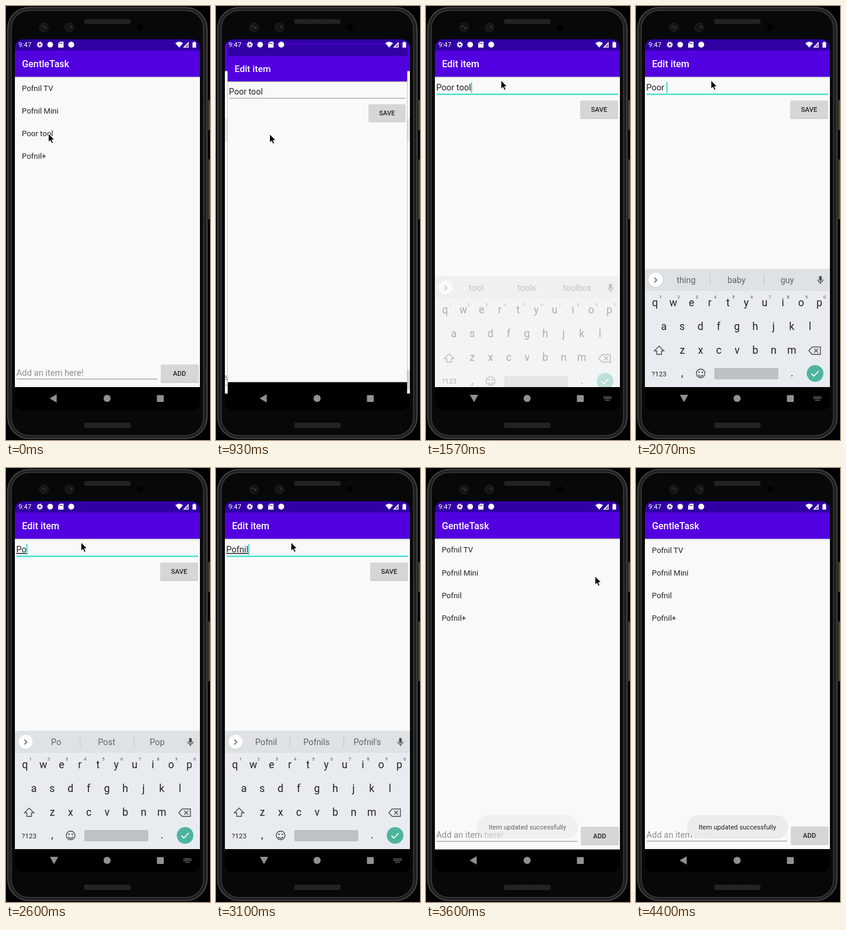
Recreate the animation shown at these times as an HTML page. Size 344 by 730 pixels, loop 4430 ms.

```html
<!DOCTYPE html>
<html lang="en">
<head>
<meta charset="utf-8">
<title>List app demo</title>
<style>
  html, body { margin: 0; width: 100%; height: 100%; overflow: hidden; background: #000; }
  svg { display: block; width: 344px; height: 730px; }
  text { font-family: Roboto, sans-serif; fill: #222; white-space: pre; }
  .item { font-size: 13px; }
  .title { font-size: 15.9px; font-weight: 500; fill: #fff; }
  .field { font-size: 14.5px; }
  .btn { font-size: 11.2px; font-weight: 500; text-anchor: middle; }
  .mid { text-anchor: middle; }
  .key { font-size: 17.5px; }
  .hint { font-size: 7.5px; fill: #50555a; }
  .sug { font-size: 14.3px; fill: #5f6368; }
  .icon { fill: none; stroke: #4a4e52; stroke-width: 1.4; }
</style>
</head>
<body>
<svg viewBox="0 0 344 730">
  <defs>
    <clipPath id="screen"><rect x="15" y="56" width="312" height="624" rx="14"/></clipPath>
    <clipPath id="aboveNav"><rect x="15" y="56" width="312" height="585"/></clipPath>
    <pattern id="mesh" width="3" height="3" patternUnits="userSpaceOnUse">
      <rect width="3" height="3" fill="#262626"/><circle cx="1.5" cy="1.5" r=".9" fill="#1a1a1a"/>
    </pattern>
    <linearGradient id="shade" x2="0" y2="1">
      <stop stop-opacity=".2"/><stop offset="1" stop-opacity="0"/>
    </linearGradient>
    <g id="window">
      <rect x="15" y="56" width="312" height="624" fill="#000"/>
      <rect x="15" y="56" width="312" height="19.5" fill="#3000a4"/>
      <rect x="15" y="119" width="312" height="522" fill="#f9f9f9"/>
      <rect x="15" y="119" width="312" height="3" fill="url(#shade)"/>
      <rect x="15" y="75" width="312" height="44" fill="#5300e1"/>
    </g>
    <g id="button">
      <rect y="1" width="64" height="30" rx="2" fill="#000" opacity=".18"/>
      <rect width="64" height="29.5" rx="2" fill="#d5d6d6"/>
    </g>
  </defs>

  <!-- phone body -->
  <g fill="none">
    <rect x="338" y="158" width="6" height="51" rx="2" fill="#454545"/>
    <rect x="338" y="258" width="6" height="101" rx="2" fill="#454545"/>
    <rect x="1" y="1" width="340" height="728" rx="38" fill="#080808"/>
    <rect x="6" y="5" width="330" height="720" rx="33" stroke="#1f1f1f" stroke-width="6"/>
    <rect x="3" y="2.5" width="336" height="725" rx="36" stroke="#4c4c4c" stroke-width="1.6"/>
    <rect x="9" y="7.5" width="324" height="715" rx="30" stroke="#3c3c3c" stroke-width="1.4"/>
    <rect x="132" y="22" width="78" height="8" rx="2" fill="url(#mesh)"/>
    <rect x="132" y="701" width="78" height="9" rx="2" fill="url(#mesh)"/>
    <g fill="#151515" stroke="#242424">
      <circle cx="64" cy="36" r="7.5"/><circle cx="107" cy="36" r="7.5"/>
    </g>
    <path d="M61 33l2 2M65 38l2-3M109 33l2 4" stroke="#484848" stroke-width="1.5"/>
    <circle cx="226" cy="36" r="5.5" fill="#000"/>
  </g>

  <g clip-path="url(#screen)">
    <rect x="15" y="56" width="312" height="624"/>
    <g id="list">
      <use href="#window"/>
      <rect id="ripple" x="15" y="196" width="312" height="38" opacity="0"/>
      <text class="title" x="27" y="103.3">GentleTask</text>
      <g class="item">
        <text x="26.8" y="143">Pofnil TV</text>
        <text x="26.8" y="181">Pofnil Mini</text>
        <text id="third" x="26.8" y="219">Poor tool</text>
        <text x="26.8" y="257.3">Pofnil+</text>
      </g>
      <text class="field" x="17.6" y="621.5" style="fill:#8d8d8d">Add an item here!</text>
      <path d="M18 627.5H255" stroke="#8a8a8a"/>
      <use href="#button" x="261" y="603"/>
      <text class="btn" x="292.5" y="622">ADD</text>
    </g>
    <g id="edit">
      <use href="#window"/>
      <text class="title" x="27" y="103.3">Edit item</text>
      <text id="entry" class="field" x="17.2" y="142"></text>
      <path id="line" d="M18 148.5H324"/>
      <path id="caret" stroke="#19d6c0" stroke-width="1.6"/>
      <use href="#button" x="260" y="159"/>
      <text class="btn" x="292" y="178">SAVE</text>
    </g>

    <g clip-path="url(#aboveNav)">
      <g id="keyboard">
        <rect x="15" y="442" width="312" height="199" fill="#e8ecf0"/>
        <rect x="15" y="442" width="312" height="37" fill="#dee2e5"/>
        <circle cx="33" cy="461.5" r="12.3" fill="#000" opacity=".12"/>
        <circle cx="33" cy="460.7" r="12" fill="#fff"/>
        <path d="M31 457l4 4-4 4" class="icon"/>
        <path d="M125 451V470M215.5 451V470" stroke="#c3c7cb"/>
        <g class="mid" id="sugs">
          <text class="sug" x="84.5" y="466"/><text class="sug" x="169.5" y="466"/><text class="sug" x="255" y="466"/>
        </g>
        <rect x="308.7" y="454" width="4.6" height="8.5" rx="2.3" fill="#4a4e52"/>
        <path d="M306.5 460a4.5 4.5 0 0 0 9 0M311 464.5V468" class="icon"/>
        <g id="keys"></g>
        <path d="M39 572l-8 8h4v6h8v-6h4z" class="icon"/>
        <path d="M297 573.5H311V586H297L291.5 579.7zM300.5 576.5l6.500 6.500M307 576.5l-6.500 6.500" class="icon"/>
        <circle cx="109" cy="618" r="7.3" class="icon"/>
        <path d="M105 620a4.3 4.3 0 0 0 8 0" class="icon"/>
        <circle cx="106.3" cy="616" r="1.1"/><circle cx="111.7" cy="616" r="1.1"/>
        <rect x="132" y="609" width="108" height="19" rx="2" fill="#bcc1c6"/>
        <circle cx="302" cy="618" r="14" fill="#4db49f"/>
        <path d="M296 618.5l4 4 8-8.5" fill="none" stroke="#fff" stroke-width="1.8"/>
      </g>
    </g>

    <g id="toast">
      <rect x="86" y="585" width="170" height="38.5" rx="19" opacity=".06"/>
      <rect x="86" y="584" width="170" height="38" rx="19" fill="#ececec" opacity=".94"/>
      <text class="mid" x="171" y="607.5" font-size="11.2">Item updated successfully</text>
    </g>

    <!-- status bar -->
    <g fill="#fff">
      <text x="21" y="69" font-size="11.3" style="fill:#fff">9:47</text>
      <circle cx="57" cy="65" r="2.8" fill="none" stroke="#fff" stroke-width="2"/>
      <circle cx="57" cy="65" r="4.4" fill="none" stroke="#fff" stroke-width="1.6" stroke-dasharray="1.73"/>
      <circle cx="74.5" cy="65" r="4.8"/>
      <path d="M91 60H97V70H88V63z"/>
      <path d="M90.5 62v2M92.5 62v2M94.5 62v2" stroke="#3000a4"/>
      <circle cx="110" cy="65" r="5"/>
      <path d="M285.5 62.5Q292 57.5 298.5 62.5L292 70zM308 60V70H298.5z"/>
      <path d="M302 69h5v-6z" fill="#3000a4" opacity=".6"/>
      <path d="M314.5 61.2h1.7V60h2.6v1.2h1.7V70h-6z"/>
    </g>

    <!-- navigation bar -->
    <g fill="#919191">
      <path id="back"/>
      <circle cx="170.5" cy="660" r="6"/>
      <rect x="254.5" y="654.5" width="11.5" height="11.5" rx="1"/>
      <path id="switcher" d="M299.5 657.5H312.5M299.5 660H312.5M302 663H310" fill="none"
        stroke="#919191" stroke-width="1.6" stroke-dasharray="1.6 .7"/>
    </g>
  </g>

  <path id="pointer" d="M0 0V14.5L3.3 11.4 5.5 16.6 8 15.5 5.8 10.5H10.3z" stroke="#fff"/>
</svg>
<script>
const LOOP = 4430, OPEN = 824, FOCUS = 1430, SHOW = 1490, CLOSE = 3350;
const $ = id => document.getElementById(id);
const clamp = v => Math.min(1, Math.max(0, v));
const part = (t, start, length) => clamp((t - start) / length);
const smooth = p => p * p * (3 - 2 * p);

// [time, entered text, suggestions]
const edits = [
  [0, 'Poor tool', 'tool tools toolbox'],
  [1770, 'Poor too', 'too took tool'],
  [1860, 'Poor to', 'to top too'],
  [1950, 'Poor t', 'to the thing'],
  [2030, 'Poor ', 'thing baby guy'],
  [2150, 'Poor', 'Poor Poorly Poorer'],
  [2240, 'Poo', 'Pool Poor Poof'],
  [2330, 'Po', 'Po Post Pop'],
  [2680, 'Pof', 'Pof Pofs Off'],
  [2860, 'Pofn', 'Pofn Pofnil Pond'],
  [2960, 'Pofni', 'Pofni Pofnil Pony'],
  [3060, 'Pofnil', "Pofnil Pofnils Pofnil's"]
];

// [time, x, y] of the mouse pointer tip
const path = [
  [30, 71.5, 214.5], [250, 90.5, 215.5], [1080, 90.5, 215.5], [1310, 126.5, 123],
  [1380, 126.5, 125], [3150, 126.5, 125], [3320, 285, 182]
];

const key = (s, x, y, cls = 'key') => `<text class="${cls} mid" x="${x}" y="${y}">${s}</text>`;
const row = (letters, x, y, cls) => [...letters].map((c, i) => key(c, x + i * 30.8, y, cls)).join('');
$('keys').innerHTML = row('qwertyuiop', 32, 504.5) + row('asdfghjkl', 47, 544.5) +
  row('zxcvbnm', 78, 584.5) + key(',', 78, 623) + key('.', 263, 623) +
  row('1234567890', 41, 492, 'hint') +
  '<text class="mid" x="39" y="622.5" font-size="11.5">?123</text>';

function bezier(u, a, b, c, d) {
  const v = 1 - u;
  return v * v * v * a + 3 * v * v * u * b + 3 * v * u * u * c + u * u * u * d;
}

// quick start, very slow finish: two joined cubic curves
function windowEase(x) {
  const [xs, ys] = x < 1 / 6
    ? [[0, .05, .1333, 1 / 6], [0, 0, .06, .4]]
    : [[1 / 6, .2083, .25, 1], [.4, .82, 1, 1]];
  let lo = 0, hi = 1;
  for (let i = 0; i < 20; i++) {
    const mid = (lo + hi) / 2;
    bezier(mid, ...xs) < x ? lo = mid : hi = mid;
  }
  return bezier(lo, ...ys);
}

function place(el, scale, alpha = 1) {
  el.setAttribute('transform', `translate(171 368) scale(${scale}) translate(-171 -368)`);
  el.setAttribute('opacity', alpha);
}

function pointerAt(t) {
  const i = path.findIndex(k => k[0] > t);
  if (i < 0) return path.at(-1).slice(1);
  if (i === 0) return path[0].slice(1);
  const a = path[i - 1], b = path[i], p = smooth((t - a[0]) / (b[0] - a[0]));
  return [a[1] + (b[1] - a[1]) * p, a[2] + (b[2] - a[2]) * p];
}

function drawWindows(t) {
  const closing = t >= CLOSE, begin = closing ? CLOSE : OPEN;
  const p = windowEase(part(t, begin, 400));
  const fade = part(t, begin + 35, 50);
  place($('list'), closing ? 1.1 - .1 * p : 1 + .05 * p);
  place($('edit'), closing ? 1 - .1 * p : .85 + .15 * p, closing ? 1 - fade : fade);
  $('third').textContent = closing ? 'Pofnil' : 'Poor tool';
  $('ripple').setAttribute('opacity', closing ? 0 : .09 * part(t, 710, 90) * (1 - part(t, 900, 150)));
}

function drawEntry(t) {
  const [time, text, words] = edits.findLast(e => e[0] <= t);
  const entry = $('entry'), focused = t >= FOCUS;
  entry.textContent = text;
  entry.style.textDecoration = time >= 2150 ? 'underline' : 'none';
  $('line').setAttribute('stroke', focused ? '#22dcc4' : '#8a8a8a');
  $('line').setAttribute('stroke-width', focused ? 2 : 1);
  const x = 18 + entry.getComputedTextLength();
  $('caret').setAttribute('d', focused ? `M${x} 128V146` : '');
  words.split(' ').forEach((w, i) => $('sugs').children[i].textContent = w);
}

function drawKeyboard(t) {
  const shown = smooth(part(t, SHOW, 200)) * (1 - smooth(part(t, CLOSE, 150)));
  const up = t >= SHOW && t < CLOSE + 75;
  $('keyboard').setAttribute('opacity', shown);
  $('keyboard').setAttribute('transform', `translate(0 ${20 * (1 - shown)})`);
  $('back').setAttribute('d', up ? 'M74 654H88L81 666.5z' : 'M73.5 660L85.5 653V667z');
  $('switcher').setAttribute('opacity', up ? 1 : 0);
}

function draw(t) {
  drawWindows(t);
  drawEntry(t);
  drawKeyboard(t);
  $('toast').setAttribute('opacity', part(t, 3450, 220));
  $('pointer').setAttribute('transform', `translate(${pointerAt(t)})`);
  $('pointer').setAttribute('opacity', t < 3800 ? 1 : 0);
}

let start;
function tick(now) {
  start ??= now;
  draw((now - start) % LOOP);
  requestAnimationFrame(tick);
}
draw(0);
requestAnimationFrame(tick);
</script>
</body>
</html>
```
